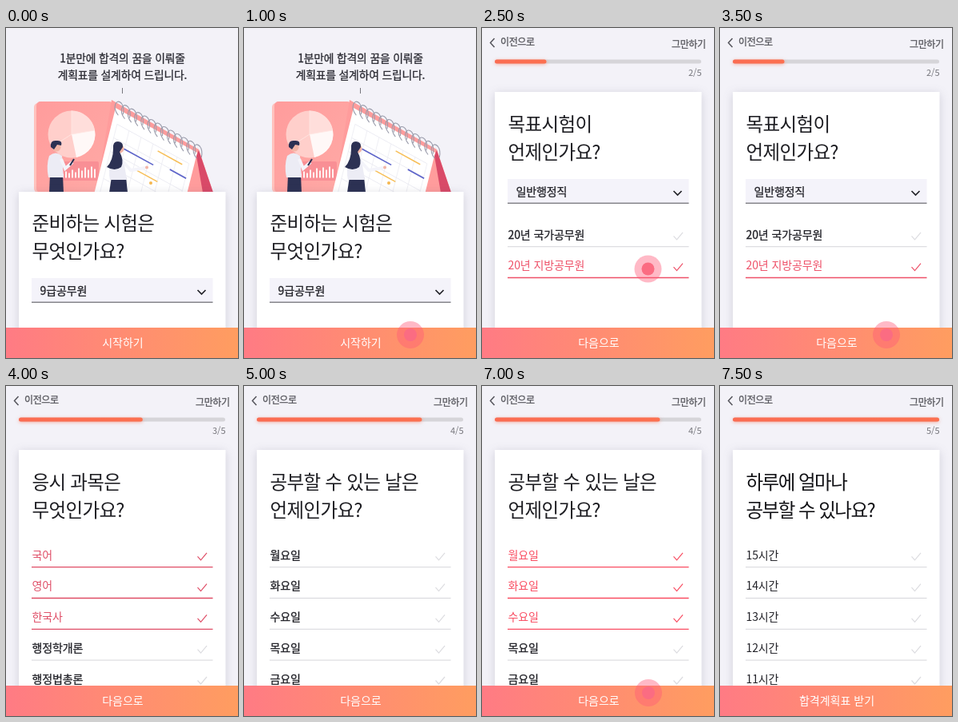
Recreate the animation shown at these times as an HTML page. Size 290 by 413 pixels, loop 8000 ms.

```html
<!DOCTYPE html>
<html lang="ko">
<head>
<meta charset="utf-8">
<style>
html, body { margin: 0; width: 100%; height: 100%; overflow: hidden; background: #f3f2f8; }
svg { display: block; width: 290px; height: 413px; font-family: "Noto Sans CJK KR", "Noto Sans KR", sans-serif; }
text { fill: currentColor; }
.card { fill: #fff; filter: drop-shadow(0 2px 6px rgba(70, 70, 100, .2)); }
.glow { filter: drop-shadow(0 1px 2px rgba(250, 110, 80, .5)); }
.title { font-size: 23.5px; font-weight: 300; letter-spacing: -.65px; color: #1d1d22; }
.tight { letter-spacing: -1.5px; font-weight: 400; color: #111115; }
.item { font-size: 14px; letter-spacing: -.1px; }
.nav { font-size: 12px; letter-spacing: -.4px; color: #5a5a60; }
.count { font-size: 11px; color: #77777d; text-anchor: end; }
.intro { font-size: 13.8px; letter-spacing: -.15px; color: #2b2b33; text-anchor: middle; }
.button { font-size: 14px; color: #fff; text-anchor: middle; }
.medium { stroke: currentColor; stroke-width: .3px; }
.line { fill: none; }
</style>
</head>
<body>
<svg viewBox="0 0 290 413">
  <defs>
    <linearGradient id="warm"><stop stop-color="#ff7b84"/><stop offset="1" stop-color="#ff9d60"/></linearGradient>
    <linearGradient id="bar"><stop stop-color="#fb6c52"/><stop offset="1" stop-color="#fc7050"/></linearGradient>
    <linearGradient id="panel" x2="1" y2="1"><stop stop-color="#ff9c9c"/><stop offset="1" stop-color="#ffaaa6"/></linearGradient>
  </defs>
  <g id="screen"></g>
</svg>
<script>
const STEP = 500, STEPS = 16, DARK = '#222228', PALE = '#dcdce0';
const screen = document.getElementById('screen');

const text = (x, y, s, cls, color = '') => `<text x="${x}" y="${y}" class="${cls}" style="color:${color}">${s}</text>`;
const rect = (x, y, w, h, fill, attrs = '') => `<rect x="${x}" y="${y}" width="${w}" height="${h}" fill="${fill}" ${attrs}/>`;
const path = (d, fill) => `<path d="${d}" fill="${fill}"/>`;
const line = (d, color, width = 1) => `<path d="${d}" class="line" stroke="${color}" stroke-width="${width}"/>`;
const circle = (x, y, r, fill) => `<circle cx="${x}" cy="${y}" r="${r}" fill="${fill}"/>`;
const range = n => [...Array(n).keys()];

const title = (y, lines, cls = '') => lines.map((s, i) => text(32.5, y + i * 35, s, 'title ' + cls)).join('');
const card = (y, h) => rect(16, y, 258.5, h, '#fff', 'class="card"');
const button = s => rect(0, 375, 290, 38, 'url(#warm)') + text(146, 398.5, s, 'button');
const touch = ([x, y]) => circle(x, y, 17, 'rgba(255,90,120,.42)') + circle(x, y, 8, '#fb6c82');

const select = (y, s) => rect(32, y, 226.5, 30, '#f4f3fa') +
  line(`M32 ${y + 30.2}h226.5`, '#4a4a52') +
  text(42.5, y + 20.5, s, 'item medium', DARK) +
  line(`M239.500 ${y + 15}l5 5 5-5`, DARK, 1.7);

function list(y, names, chosen, red, cls = 'medium') {
  return names.map((s, i) => {
    const on = chosen.includes(i), row = y + i * 38.8;
    return text(32.5, row + 5.5, s, 'item ' + (on ? '' : cls), on ? red : DARK) +
      line(`M32 ${row + 15.7}h226.5`, on ? red : '#d6d6db', on ? 1.3 : 1) +
      line(`M239.500 ${row + 2.3}l4 4.500 7.500-9`, on ? red : PALE, 1.2);
  }).join('');
}

function header(count, part) {
  return line('M15.500 13l-5 5.500 5 5.500', '#55555c', 1.5) +
    text(23, 21.5, '이전으로', 'nav medium') + text(237, 25, '그만하기', 'nav medium') +
    rect(16, 39.5, 258, 5, '#d6d5d9', 'rx="2.5"') +
    rect(16, 39.5, 258 * part, 5, 'url(#bar)', 'rx="2.5" class="glow"') +
    text(274.5, 60, count + '/5', 'count');
}

function chartPanel() {
  const bars = [5, 8, 6, 10, 7, 12, 9, 13, 10, 14, 11];
  return rect(35, 94, 96, 112, '#ffc2bd', 'rx="5"') + rect(38, 92, 96, 114, 'url(#panel)', 'rx="5"') +
    circle(82, 133, 29.5, '#ffcfcb') +
    path('M82 133V103.500A29.500 29.500 0 0 1 111 128Z', '#ffdedb') +
    path('M82 133L111 128A29.500 29.500 0 0 1 88 162Z', '#fff8f7') +
    line('M82 103.500V133L111 128M82 133L57 149', '#ffe7e4', .8) +
    rect(62, 167, 54, 24, '#f98f95', 'rx="2"') +
    bars.map((h, i) => rect(70 + i * 4, 187.5 - h, 2, h, '#fff2f0')).join('');
}

function calendar() {
  const px = (u, v) => 137 + 102 * u - 25 * v, py = (u, v) => 100 + 56 * u + 100 * v;
  const pt = (u, v) => `${px(u, v)} ${py(u, v)}`;
  const seg = (u, v, w, color, size) => line(`M${pt(u, v)}L${pt(u + w, v)}`, color, size);
  const grid = range(5).map(i => seg(.06, .17 + i * .17, .88, '#e4e4ee', .7)).join('') +
    range(7).map(i => line(`M${pt(.06 + i * .147, .17)}L${pt(.06 + i * .147, 1.1)}`, '#e8e8f0', .7)).join('');
  const rings = range(13).map(i => {
    const u = .04 + i * .08, x = px(u, .03), y = py(u, .03);
    return line(`M${x} ${y + 4}C${x - 8} ${y - 6} ${x - 3} ${y - 18} ${x + 4} ${y - 11}Q${x + 8} ${y - 6} ${x + 6} ${y + 3}`, '#9a9cab', 1.1);
  }).join('');
  return path('M132 90L241 152 259 206H118L117 180Z', '#ff9c9c') + path('M238 160L241 153 259 206H246Z', '#d94a68') +
    path(`M${pt(0, 0)}L${pt(1, 0)}L${pt(1, 1.2)}L${pt(0, 1.2)}Z`, '#fff') + grid +
    seg(.2, .4, .36, '#5b62c9', 1.6) + seg(.57, .22, .3, '#f7bf58', 1.5) +
    seg(.75, .35, .2, '#5b62c9', 1.6) + seg(.4, .56, .25, '#f7bf58', 1.5) +
    circle(181, 194, 2, '#f5b851') + rings;
}

function people() {
  const navy = '#2c3153', skin = '#f3b5a6';
  return path('M55 184H71L72 206H54Z', navy) +
    path('M54 160Q62 153 70 160L72 187H53Q50 172 54 160Z', '#ececf5') +
    line('M69 164L74 176 83 168', '#f4f4fa', 4) + line('M80 172L85 164', navy, 2) +
    circle(63, 149, 5.5, skin) + path('M56 149Q55 140 63 141 71 140 69 147L64 146 60 152Z', navy) +
    path('M132 186H150L152 206H129Z', navy) +
    path('M132 165Q140 159 147 165L151 190H130Q127 178 132 165Z', '#ececf5') +
    line('M147 168L156 178 174 175', '#f4f4fa', 4) + circle(176, 174.5, 2, skin) +
    circle(142, 151, 5.5, skin) + path('M134 151Q133 142 140 142 147 143 146 149L142 155Q148 166 144 174 136 180 126 174 134 166 134 151Z', navy);
}

const start = () => text(145.5, 43, '1분만에 합격의 꿈을 이뤄줄', 'intro medium') +
  text(145.5, 64, '계획표를 설계하여 드립니다.', 'intro medium') + line('M145.500 75v7', '#77777d') +
  chartPanel() + calendar() + people() + card(205, 220) +
  title(253, ['준비하는 시험은', '무엇인가요?']) + select(313, '9급공무원') + button('시작하기');

const page = (count, part, heading, body, label = '다음으로', height = 340) =>
  header(count, part) + card(80, height) + heading + body + button(label);

const exam = (open, chosen) => page(2, .25, title(128.5, ['목표시험이', '언제인가요?']),
  select(189, '일반행정직') + (open ? list(258, ['20년 국가공무원', '20년 지방공무원'], chosen, '#ee5068') : ''),
  '다음으로', open ? 340 : 232);

const subjects = () => page(3, .6, title(128.5, ['응시 과목은', '무엇인가요?']),
  list(211, ['국어', '영어', '한국사', '행정학개론', '행정법총론'], [0, 1, 2], '#df4d66'));

const days = n => page(4, .8, title(128.5, ['공부할 수 있는 날은', '언제인가요?']),
  list(211, ['월', '화', '수', '목', '금'].map(d => d + '요일'), range(n), '#f94d62'));

const hours = () => page(5, 1, title(128.5, ['하루에 얼마나', '공부할 수 있나요?'], 'tight'),
  list(211, range(5).map(i => 15 - i + '시간'), [], '', ''), '합격계획표 받기');

function view(k) {
  if (k < 3) return start();
  if (k < 8) return exam(k > 3, k > 4 ? [1] : []);
  if (k < 10) return subjects();
  if (k < 15) return days(Math.min(k - 10, 3));
  return hours();
}

const next = [208, 384];
const touches = {
  1: [208, 329], 2: next, 3: [207.5, 206.5], 5: [207.5, 301.5], 7: next, 9: next,
  11: [215.5, 213], 12: [215.5, 253], 13: [215.5, 292], 14: next
};

let shown = -1;
function draw(now) {
  const k = Math.floor(now / STEP) % STEPS;
  if (k !== shown) {
    shown = k;
    screen.innerHTML = view(k) + (touches[k] ? touch(touches[k]) : '');
  }
  requestAnimationFrame(draw);
}
draw(performance.now());
</script>
</body>
</html>
```
